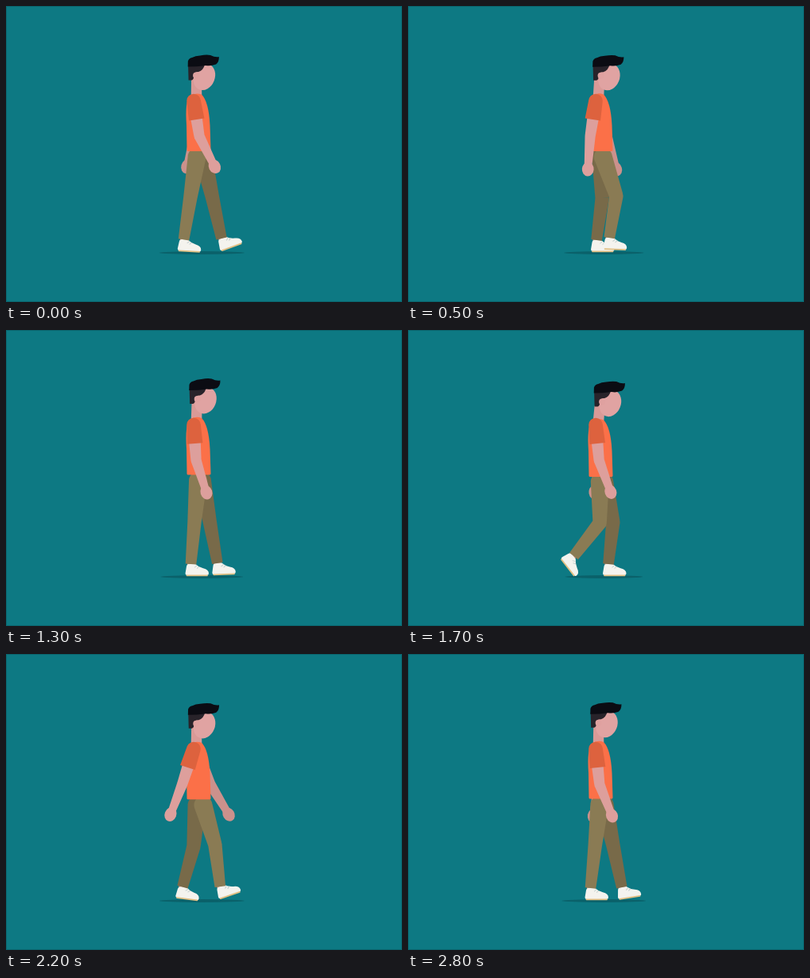
An HTML page for the animation above (2.9 s loop, 498x373 px).

```html
<!DOCTYPE html>
<html lang="en">
<head>
<meta charset="utf-8">
<title>Walk cycle</title>
<style>
html, body { margin: 0; width: 100%; height: 100%; overflow: hidden; background: #0d7983; }
svg { display: block; width: 498px; height: 373px; }
</style>
</head>
<body>
<svg viewBox="0 0 498 373">
  <defs>
    <!-- origin at the ankle -->
    <g id="shoe" transform="translate(7.5 9.3)">
      <path fill="#cd9586" d="M-12 -12 h9 v7 h-9Z"/>
      <path fill="#f4f3ee" d="M-14.5 4 L-13 -5 Q-12.5 -8 -9 -8 L-2 -8 Q2 -4 8 -2.5 Q15 -1 15 4 Q15 6.3 12.5 6.3 L-12 6.3 Q-14.5 6.3 -14.5 4Z"/>
      <path fill="none" stroke="#e3c083" stroke-width="1.8" stroke-linecap="round" d="M-12.5 6.5 H13"/>
      <path fill="none" stroke="#c3cfcd" d="M-3 -3.5 L0 -6 M0 -2.2 L3 -4.6"/>
    </g>
  </defs>
  <rect width="498" height="373" fill="#0d7983"/>
  <rect x=".5" y=".5" width="497" height="372" fill="none" stroke="#0b656e"/>
  <ellipse id="shadow" cx="246.3" cy="311" ry="1.9" fill="#0a616a"/>
  <g id="farArm" fill="#cb918c"><path/><ellipse rx="7.3" ry="9"/></g>
  <g id="farLeg"><use href="#shoe"/><path fill="#786a49"/></g>
  <g id="nearLeg"><use href="#shoe"/><path fill="#8a7b54"/></g>
  <path id="neck" fill="#d99a97"/>
  <path id="shirt" fill="#fb7048" d="M231 113 Q238 108 246 111 Q255 120 256.5 150 L257.5 181 Q257.5 182.5 256 182.5 L229 182.5 Q227.5 182.5 227.5 181 L227 150 Q225 119 231 113Z"/>
  <g id="nearArm" fill="#dd9f9c"><path/><ellipse rx="7.4" ry="9"/></g>
  <path id="sleeve" fill="#dd623e"/>
  <g id="head">
    <ellipse cx="249.3" cy="89" rx="13.2" ry="17" fill="#e0a3a2" transform="rotate(22 249.3 89)"/>
    <path fill="#28232a" d="M229 74 L250 73 Q248 81 242 82.5 Q237 82 236.5 86 Q236.5 92 233.5 93 L229.5 93Z"/>
    <circle cx="239" cy="87" r="4" fill="#dfa1a0"/>
    <path fill="#0b0c13" d="M228.6 76 L228.8 69 Q230 65 234 64.5 Q238 62 244 62 Q252 60.5 257 61.5 Q263 64.5 267.8 63.5 Q268 70 264 73 Q258 75.5 251 74.5 Q240 76 228.6 76Z"/>
  </g>
</svg>
<script>
const LOOP = 2900, STEP = 100, CYCLE = LOOP / 2, BONE = 51.9;
const $ = id => document.getElementById(id);
const wave = u => Math.cos(2 * Math.PI * u);
const ease = s => {
  s = Math.min(1, Math.max(0, s));
  return s * s * (3 - 2 * s);
};
// Smooth hump around c, reaching w to both sides, on a phase that wraps at 1
const hump = (u, c, w) => {
  const d = Math.abs(u - c);
  return ease(1 - Math.min(d, 1 - d) / w);
};

// Tapered limb through [x, y, radius] points, flat at the end
function limb(...points) {
  let d = "";
  for (let i = 0; i + 1 < points.length; i++) {
    const [x, y, r] = points[i], [X, Y, R] = points[i + 1];
    const len = Math.hypot(X - x, Y - y);
    const nx = (y - Y) / len, ny = (X - x) / len;
    d += `M${x + nx * r} ${y + ny * r}L${X + nx * R} ${Y + ny * R}`
      + `L${X - nx * R} ${Y - ny * R}L${x - nx * r} ${y - ny * r}Z`
      + `M${x - r} ${y}a${r} ${r} 0 1 0 ${2 * r} 0a${r} ${r} 0 1 0 ${-2 * r} 0Z`;
  }
  return d;
}

// Knee between hip and ankle, bent forward, with two equal bones
function bend(hx, hy, ax, ay) {
  const dx = ax - hx, dy = ay - hy, len = Math.hypot(dx, dy);
  const out = Math.sqrt(Math.max(0, BONE ** 2 - len ** 2 / 4));
  return [(hx + ax) / 2 + out * dy / len, (hy + ay) / 2 - out * dx / len];
}

// u runs from one heel strike of this leg to the next
function drawLeg(id, u, bob) {
  const lift = .68, land = .92, front = 267, pace = 87;
  const swing = Math.min(1, Math.max(0, (u - lift) / (land - lift)));
  const push = hump(u, .67, .2), strike = hump(u, 0, .13);
  const back = pace * Math.min(u, lift) * (1 - ease(swing));
  const ax = front - back + 4 * strike;
  const ay = 293.5 - 10 * push - 2 * strike - 3 * Math.sin(Math.PI * swing);
  const angle = 52 * push - 20 * strike;
  const hx = 244 + 4 * wave(u - .04), hy = 190 + bob / 2;
  const [shoe, trouser] = $(id).children;
  shoe.setAttribute("transform", `translate(${ax} ${ay}) rotate(${angle})`);
  trouser.setAttribute("d",
    limb([hx, hy, 11.5], [...bend(hx, hy, ax, ay), 8.7], [ax, ay + 1.5, 6.8]));
}

function drawArm(id, sx, sy, width, ex, hx, sway) {
  const ey = 164, hy = 206 - 4 * sway * sway;
  const [arm, hand] = $(id).children;
  const turn = Math.atan2(ex - hx, hy - ey) * 180 / Math.PI;
  arm.setAttribute("d", limb([sx, sy, width], [ex, ey, 6.6], [hx, hy, 4.6]));
  hand.setAttribute("transform", `translate(${hx} ${hy}) rotate(${turn})`);
}

function draw(t) {
  const u = t / CYCLE % 1, v = 2 * u;
  const sway = wave(u - .045);
  const bob = 1.2 + 1.3 * wave(v - .34);
  const headX = 3 + 3 * wave(v - .47), headY = 1.7 + 1.9 * wave(v - .36);
  const sx = 236, sy = 119.5, ex = 232.5 + 11 * sway;

  $("shadow").setAttribute("rx", 50.8 + 2.8 * wave(v + .02));
  drawArm("farArm", 241, 122, 6.5, 247 - 10 * sway, 253.5 - 27 * sway, sway);
  drawLeg("farLeg", u, bob);
  drawLeg("nearLeg", (u + .5) % 1, bob);

  $("neck").setAttribute("d",
    limb([239.5 + headX * .3, 93 + headY, 6.5], [239.5, 115, 6.8]));
  $("shirt").setAttribute("transform", `translate(0 ${bob})`);
  drawArm("nearArm", sx, sy, 8, ex, 235 + 28.5 * sway, sway);
  $("sleeve").setAttribute("d",
    limb([sx, sy, 8.8], [sx + (ex - sx) * .53, sy + 23.5, 9.8]));
  $("head").setAttribute("transform", `translate(${headX} ${headY})`);
}

const start = performance.now();
function tick() {
  const t = (performance.now() - start) % LOOP;
  draw(Math.floor(t / STEP) * STEP);
  requestAnimationFrame(tick);
}
tick();
</script>
</body>
</html>
```
